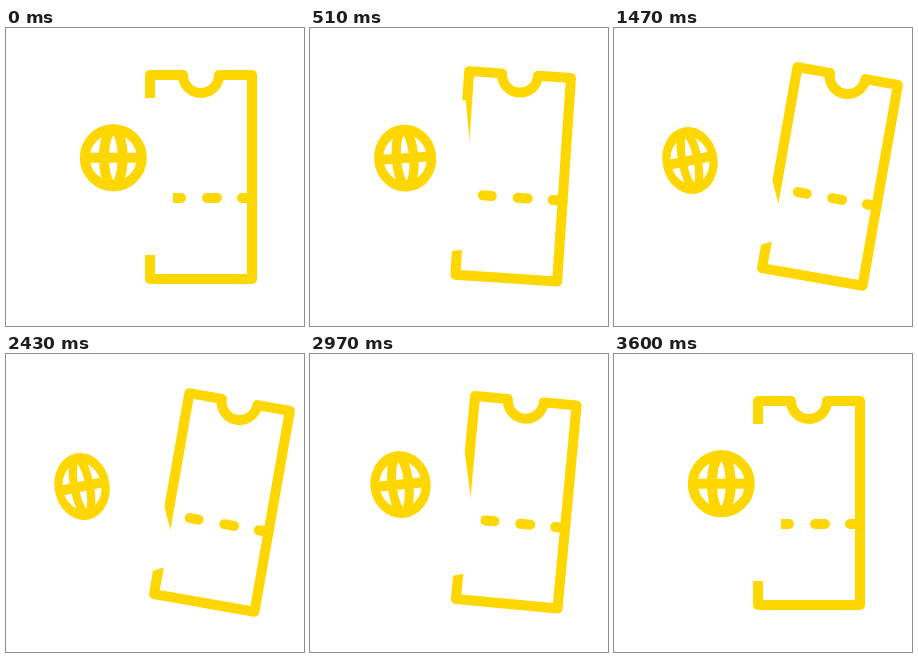
Write an HTML page that moves like this. It is 298 by 298 pixels and loops after 4.23 s.

```html
<!DOCTYPE html>
<html lang="en">
<head>
<meta charset="utf-8">
<title>Ticket and passport</title>
<style>
  html, body { margin: 0; width: 100%; height: 100%; overflow: hidden; background: #fff; }
  svg { display: block; width: 100%; height: 100%; }
  g { fill: none; stroke: #ffd700; stroke-width: 10; stroke-linejoin: round; }
</style>
</head>
<body>
<svg viewBox="0 0 298 298">
  <g id="ticket">
    <path d="M177 47H144V251H246V47H213A18 18 0 0 1 177 47Z"/>
    <path d="M166 170h9M201 170h10M236 170h10" stroke-linecap="round"/>
  </g>
  <polygon id="cover" fill="#fff"/>
  <g id="globe">
    <circle r="28.5"/>
    <ellipse rx="9.3" ry="28.5"/>
    <path d="M-28.5 0h57"/>
  </g>
</svg>
<script>
const LOOP = 4230, OPEN_END = 1470, CLOSE_START = 2400, CLOSE_TIME = 1200;
const [ticket, cover, globe] = ['ticket', 'cover', 'globe'].map(id => document.getElementById(id));

// Cubic bezier easing (x1, 0, x2, 1), solved by bisection.
function ease(t, x1, x2) {
  let lo = 0, hi = 1, s;
  for (let i = 0; i < 24; i++) {
    s = (lo + hi) / 2;
    const x = 3 * (1 - s) ** 2 * s * x1 + 3 * (1 - s) * s * s * x2 + s ** 3;
    if (x < t) lo = s; else hi = s;
  }
  return s * s * (3 - 2 * s);
}

function spread(t) {
  if (t < OPEN_END) return ease(t / OPEN_END, 0.42, 0.3);
  if (t < CLOSE_START) return 1;
  const q = Math.min(1, (t - CLOSE_START) / CLOSE_TIME);
  return (1 + Math.cos(Math.PI * q)) / 2;
}

function draw(now) {
  const p = spread(now % LOOP);
  const mix = (a, b) => a + (b - a) * p;
  ticket.setAttribute('transform', `rotate(${10 * p} 208.6 268.6)`);
  // The white passport hides the part of the ticket behind it.
  cover.setAttribute('points', [
    mix(47, 25), mix(70, 110.5),
    mix(167, 138), mix(70, 75),
    mix(167, 173), mix(227, 208.5),
    mix(47, 60), mix(227, 245)
  ].join(' '));
  const matrix = [mix(1, 0.805), -0.16 * p, 0.19 * p, mix(1, 0.985), mix(107.3, 76), 129.7 + 2.8 * p * p];
  globe.setAttribute('transform', `matrix(${matrix})`);
}

const start = performance.now();
function tick() {
  draw(performance.now() - start);
  requestAnimationFrame(tick);
}
tick();
</script>
</body>
</html>
```
